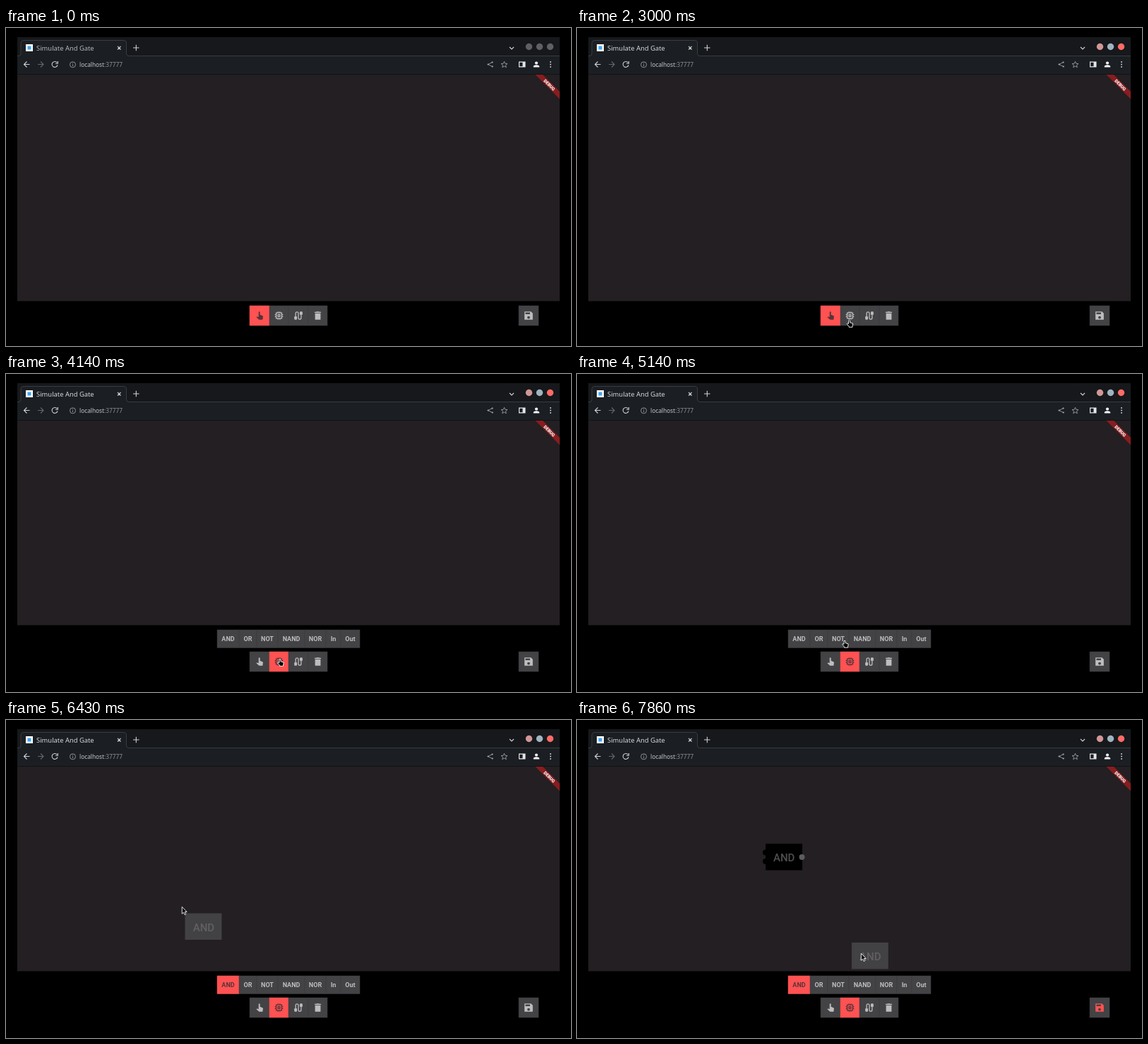
Animation, 800 px wide and 450 px high, one loop 8 s. Source, as an HTML page:

```html
<!DOCTYPE html>
<html lang="en">
<head>
<meta charset="utf-8">
<title>Simulate And Gate</title>
<style>
html, body { margin: 0; width: 100%; height: 100%; overflow: hidden; background: #000; }
svg { display: block; width: 800px; height: 450px; }
text { font-family: Roboto, sans-serif; text-anchor: middle; }
.chrome text { font-family: "Noto Sans", sans-serif; text-anchor: start; }
.line { fill: none; stroke: #d0d2d5; stroke-width: 1.1; }
.thin { stroke: #a9acaf; stroke-width: .8; }
.btn { color: #bdbcbe; }
.btn rect { fill: #434245; stroke: #3c3b3e; stroke-width: .5; }
.btn path { fill: currentColor; fill-rule: evenodd; }
.btn .wire { fill: none; stroke: currentColor; stroke-width: 2; }
.btn text { fill: currentColor; font-size: 9px; font-weight: 700; }
.btn.on { color: #55343a; }
.btn.on rect { fill: #ff5252; stroke: #ff5252; }
.dirty { color: #ff5252; }
.label { font-size: 15px; font-weight: 500; }
#cursor path { fill: #000; stroke: #fff; stroke-width: .9; stroke-linejoin: round; }
</style>
</head>
<body>
<svg viewBox="0 0 800 450">
  <g class="chrome">
    <rect x="16" y="13" width="768" height="27" fill="#16181b"/>
    <path d="M16 39.5H18Q21 39.5 21 36V21Q21 17.5 25 17.5H166Q170.5 17.5 170.5 21V36Q170.5 39.5 174 39.5H784V65H16Z" fill="#1b1f23"/>
    <path d="M16 39.5H18Q21 39.5 21 36V21Q21 17.5 25 17.5H166Q170.5 17.5 170.5 21V36Q170.5 39.5 174 39.5H784" fill="none" stroke="#42464a" stroke-width=".8"/>
    <rect x="28" y="23" width="10" height="10" fill="#fff"/>
    <rect x="30.5" y="25.5" width="5" height="5" fill="#42a5f5"/>
    <text id="title" x="43" y="31.5" font-size="9.4">Simulate And Gate</text>
    <path class="line" d="M158 26l4.5 4.5m0-4.5l-4.5 4.5M180 28h8.5m-4.2-4.2v8.5M713 27l3 3 3-3"/>
    <g id="lights"></g>
    <path class="line" d="M33.5 51.5H25.5m4-4l-4 4 4 4"/>
    <path class="line" style="stroke:#63676b" d="M45 51.5h8m-4-4l4 4-4 4"/>
    <path class="line" d="M72.300 49A4 4 0 1 0 73 52.5M73.3 47v3.2h-3.2"/>
    <circle class="line thin" cx="94.5" cy="51.8" r="4"/>
    <path class="line thin" d="M94.5 51.3v2.7m0-4.8v1"/>
    <text x="104" y="54.8" font-size="8.3" fill="#c3c5c8">localhost<tspan fill="#8d9094">:37777</tspan></text>
    <path class="line thin" d="M688.5 48.5l-6 3 6 3"/>
    <path class="line thin" stroke-linecap="round" style="stroke-width:2.2" d="M688.5 48.5h.1m-6 3h.1m6 3h.1"/>
    <path class="line thin" d="M705.5 47.3l1.3 3 3.2.2-2.5 2.1.8 3.1-2.8-1.7-2.8 1.7.8-3.1-2.5-2.1 3.2-.2z"/>
    <path fill="#e4e6e8" fill-rule="evenodd" d="M726 47.5h9.500v8H726zM727.2 48.7v5.6h4.3v-5.6z"/>
    <path fill="#f4f5f6" d="M746.8 55.5v-1q0-2 4.2-2.2 4.2.2 4.2 2.2v1z"/>
    <circle cx="751" cy="49.5" r="2.1" fill="#f4f5f6"/>
    <path class="line" stroke-linecap="round" style="stroke-width:1.9" d="M771 48h.01m0 3.5h.01m0 3.5h.01"/>
  </g>

  <rect x="16" y="65" width="768" height="1" fill="#111315"/>
  <rect x="16" y="66" width="768" height="320.5" fill="#231f22"/>
  <path d="M749.5 66H760L784 90V100.5Z" fill="#871d1f"/>
  <text transform="translate(769.4 80.6) rotate(45)" y="2.2" font-size="6.2" font-weight="900" fill="#fff">DEBUG</text>

  <g id="ghost">
    <rect width="52" height="37.5" fill="#424143"/>
    <text class="label" x="26.5" y="25" fill="#626063">AND</text>
  </g>
  <g id="gate" transform="translate(267 175)">
    <circle cy="12.5" r="4"/>
    <circle cy="25" r="4"/>
    <rect width="52" height="37.5"/>
    <circle cx="51.5" cy="19" r="4" fill="#5c5b5d"/>
    <text class="label" x="26.2" y="25" fill="#505050">AND</text>
  </g>

  <g id="parts"><rect x="16" y="355.5" width="768" height="32"/></g>
  <g id="tools"></g>
  <g id="cursor">
    <path id="arrow" d="M.3.3V10.2L2.6 8.2 4.1 11.5 5.8 10.7 4.3 7.5H7.2Z"/>
    <path id="hand" d="M-1 1V5.5L-2 5C-3.5 4.6-3.3 6-2.6 6.8L-.5 9.3V10.3H4.5V9L5 7V5L1 3.8V1Q0-.4-1 1Z"/>
  </g>
</svg>
<script>
const $ = id => document.getElementById(id);
const show = (id, on) => $(id).style.display = on ? "" : "none";
const move = (id, [x, y]) => $(id).setAttribute("transform", `translate(${x} ${y})`);
const add = (parent, markup) => $(parent).insertAdjacentHTML("beforeend", markup);

// Icons on a 24 x 24 grid: a filled part and a stroked part.
const icons = {
  touch: ["M10 4.5a1.5 1.5 0 0 1 3 0V10.5h1.200l5.500 2.800-1 7.700H11L5 15.500l1.200-1.300 3.800 1z", ""],
  chip: ["", "M6 6H18V18H6ZM10 10h4v4h-4zM10 3v3m4-3v3M10 18v3m4-3v3M3 10h3m-3 4h3M18 10h3m-3 4h3"],
  cable: ["M3 14H9V19L8 21H4L3 19ZM15 5L16 3H20L21 5V10H15Z", "M6 15V7a3 3 0 0 1 6 0V17a3 3 0 0 0 6 0V9"],
  bin: ["M6 7H18V21H6ZM5 4H8.500L9.500 3H14.500L15.500 4H19V6H5Z", ""],
  save: ["M3 3H17L21 7V21H3ZM5 5H15V9H5ZM9 16a3 3 0 1 0 6 0 3 3 0 1 0-6 0Z", ""]
};

function button(parent, id, left, right, y, h, face) {
  const x = Math.round(left), w = Math.round(right) - x;
  add(parent, `<g id="${id}" class="btn" transform="translate(${x} ${y})">
    <rect width="${w}" height="${h}"/><g transform="translate(${w / 2} ${h / 2})">${face}</g></g>`);
}
function tool(id, x, w) {
  const [solid, wire] = icons[id];
  button("tools", id, x, x + w, 393, 28,
    `<g transform="scale(.65) translate(-12 -12)"><path d="${solid}"/><path class="wire" d="${wire}"/></g>`);
}
["touch", "chip", "cable", "bin"].forEach((id, i) => tool(id, 345 + i * 27.5, 27.5));
tool("save", 726, 28);

// Part buttons are as wide as their names plus padding, centred as a row.
const names = ["AND", "OR", "NOT", "NAND", "NOR", "In", "Out"];
const widths = names.map(name => {
  add("parts", `<g class="btn"><text>${name}</text></g>`);
  const probe = $("parts").lastElementChild;
  const width = probe.firstChild.getComputedTextLength() + 12.6;
  probe.remove();
  return width;
});
let left = 400 - widths.reduce((a, b) => a + b) / 2;
names.forEach((name, i) => {
  button("parts", name, left, left += widths[i], 362, 25.5, `<text y="3.2">${name}</text>`);
});
for (let i = 0; i < 3; i++) add("lights", `<circle cx="${740.5 + 15 * i}" cy="26.5" r="4.7"/>`);

const LOOP = 8000, TICK = 1000 / 7;
const ENTER = 8, FOCUS = 15, OPEN = 29, PICK = 42, DRAG = 45, PLACE = 53, LAG = .13;

// Pointer moves, in ticks: each curves past a bend point to its end.
const home = [424, 150];
const moves = [
  { from: ENTER, to: 13, bend: [422, -50], end: [416, 30] },
  { from: FOCUS, to: 21, bend: [410, 470], end: [385.5, 413] },
  { from: 24, to: 26, bend: [386, 408], end: [388, 403] },
  { from: 31, to: 39, bend: [445, 376], end: [316, 372] },
  { from: 43, to: 48, bend: [182, 190], end: [268, 171] },
  { from: 48, to: 50, bend: [268, 173], end: [267, 175] },
  { from: PLACE, to: 57, bend: [402, 330], end: [537, 485] }
];
function pointer(tick) {
  let p = home;
  for (const { from, to, bend, end } of moves) {
    const u = Math.min(1, Math.max(0, (tick - from) / (to - from)));
    const s = u * u * (3 - 2 * u), r = 1 - s;
    p = p.map((v, i) => r * r * v + 2 * r * s * bend[i] + s * s * end[i]);
  }
  return p;
}

function draw(tick) {
  const focused = tick >= FOCUS, open = tick >= OPEN;
  $("title").setAttribute("fill", focused ? "#d3d5d8" : "#b3b5b8");
  ["#d39696", "#a0b4c0", "#ff6b66"].forEach((color, i) =>
    $("lights").children[i].setAttribute("fill", focused ? color : "#606062"));

  show("parts", open);
  $("touch").classList.toggle("on", !open);
  $("chip").classList.toggle("on", open);
  $("AND").classList.toggle("on", tick >= PICK);
  $("save").classList.toggle("dirty", tick >= PLACE);
  show("gate", tick >= PLACE);
  show("ghost", tick >= DRAG);
  move("ghost", pointer(tick - LAG));

  const [x, y] = pointer(tick);
  const overTools = y > 393 && y < 421 && x > 345 && x < 455;
  const overParts = open && y > 362 && y < 387 && x > 299 && x < 501;
  const over = overTools || overParts;
  show("cursor", tick >= ENTER);
  move("cursor", [x, y]);
  show("hand", over);
  show("arrow", !over);
}

const start = performance.now();
function run() {
  const t = (performance.now() - start) % LOOP;
  draw(Math.min(55, Math.floor((t + 5) / TICK)));
  requestAnimationFrame(run);
}
run();
</script>
</body>
</html>
```
